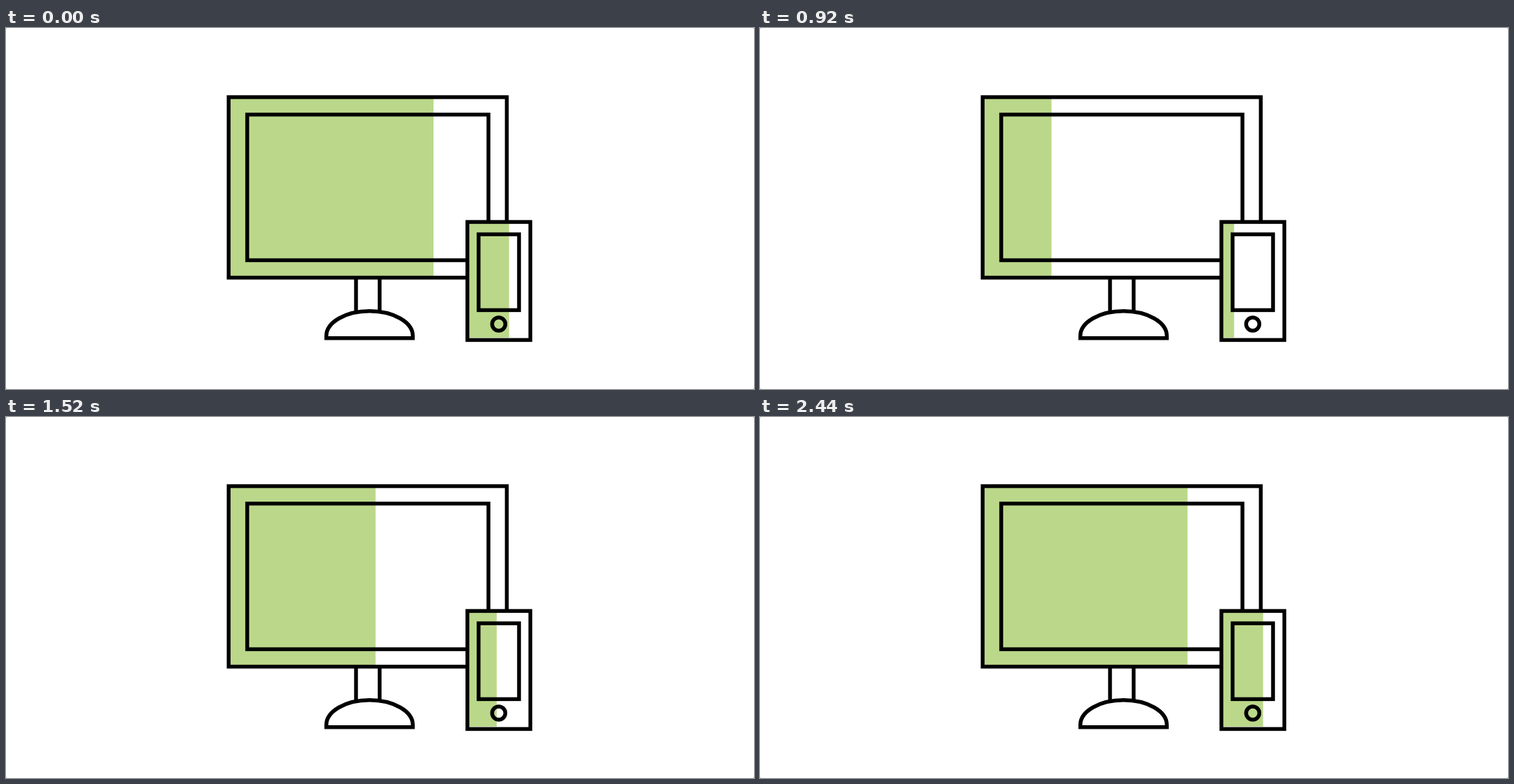
An HTML page that plays this animation: 1076 px wide and 520 px high, repeating every 2.8 s.

```html
<!DOCTYPE html>
<html lang="en">
<head>
<meta charset="utf-8">
<title>Screens filling up</title>
<style>
  html, body { margin: 0; width: 100%; height: 100%; overflow: hidden; background: #aaa; }
  svg { display: block; width: 100%; height: 100%; }
  .lines { fill: none; stroke: #000; stroke-width: 5.5; }
  .white { fill: #fff; }
  .level {
    fill: #bbd88a;
    transform-box: fill-box;
    transform-origin: left;
    animation: fill 2800ms step-end infinite;
  }
  /* Full, hard reset, then one step every 40 ms */
  @keyframes fill {
    0% { transform: scaleX(1); }
    10% { transform: scaleX(0); }
    14.2857% { transform: scaleX(0); animation-timing-function: steps(39, end); }
    70% { transform: scaleX(.9966); animation-timing-function: step-end; }
    71.4285%, 100% { transform: scaleX(1); }
  }
</style>
</head>
<body>
<svg viewBox="0 0 1076 520">
  <rect class="white" width="1076" height="520" rx="2"/>

  <!-- Monitor -->
  <rect class="level" x="322" y="100" width="293" height="257"/>
  <g class="lines">
    <path d="M503.5 360V412M537.5 360V412"/>
    <rect x="320.3" y="99.6" width="400.1" height="260"/>
    <rect x="347" y="124.7" width="347" height="209.8"/>
    <path class="white" d="M460.8 446.8V443.5A62.2 35.7 0 0 1 585.2 443.5V446.8Z"/>
  </g>

  <!-- Phone -->
  <rect class="white" x="663.7" y="279.4" width="90.6" height="170"/>
  <rect class="level" x="661.3" y="280" width="62.4" height="166"/>
  <g class="lines">
    <rect x="663.7" y="279.4" width="90.6" height="170"/>
    <rect x="679.8" y="297.2" width="58.2" height="109.2"/>
    <circle cx="708.8" cy="426.5" r="9.5"/>
  </g>
</svg>
</body>
</html>
```
